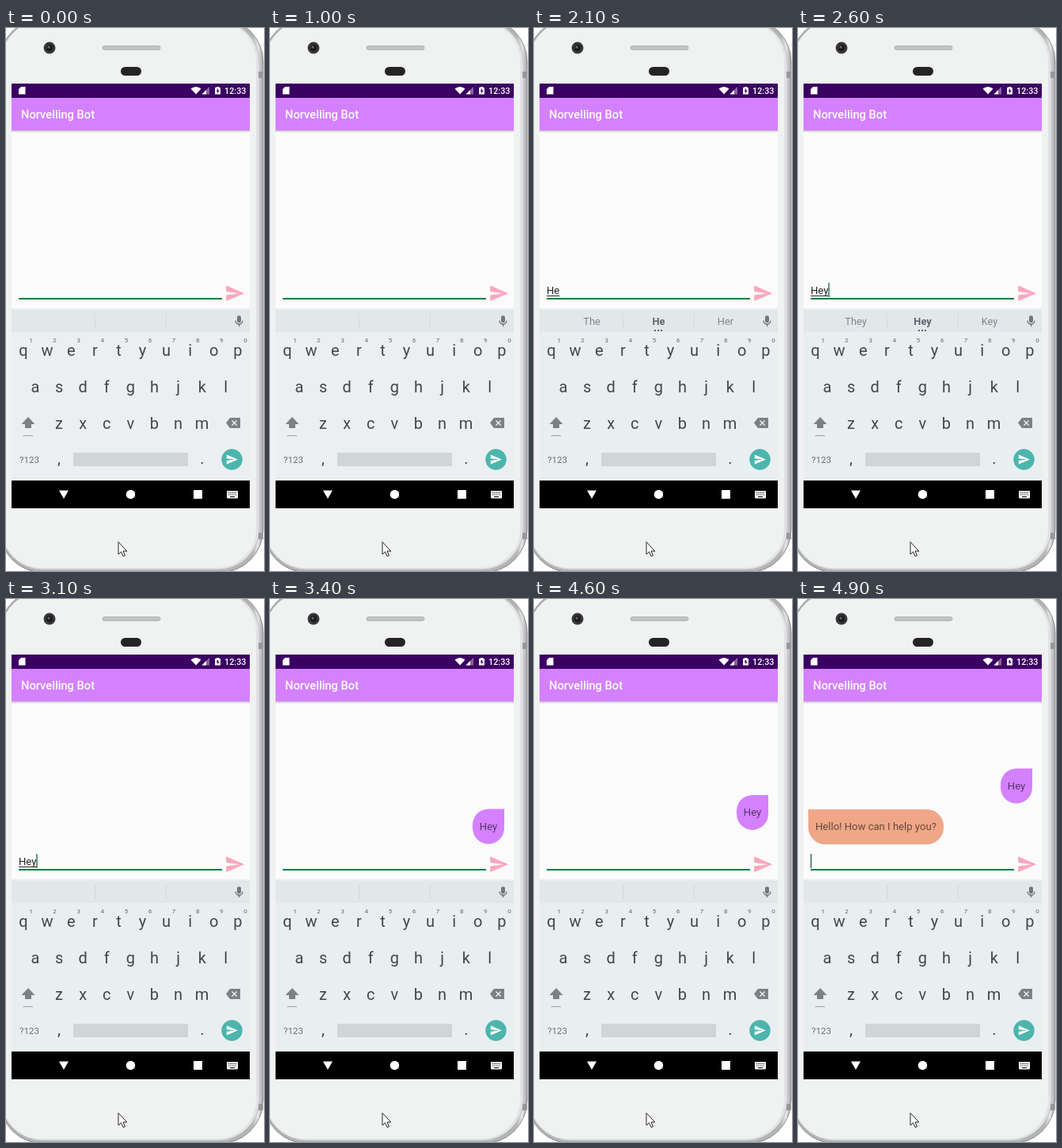
Animation of 326x684 px, one loop 5 s. Source, as an HTML page:

```html
<!DOCTYPE html>
<html lang="en">
<head>
<meta charset="utf-8">
<style>
html, body { margin: 0; width: 100%; height: 100%; overflow: hidden; background: #fff; }
svg { display: block; width: 326px; height: 684px; font-family: Roboto, sans-serif; }
.mid { text-anchor: middle; }
.key { font-size: 20px; fill: #40484c; }
.num { font-size: 8px; font-weight: 500; fill: #7b858a; }
.hint { font-size: 12.8px; fill: #7d888d; }
.msg { font-size: 13.1px; }
</style>
</head>
<body>
<svg viewBox="0 0 326 684">
  <defs>
    <linearGradient id="rim">
      <stop offset="0" stop-color="#b4b4b6"/><stop offset=".96" stop-color="#b4b4b6"/>
      <stop offset=".98" stop-color="#e6e6e8"/><stop offset="1" stop-color="#a2a2a6"/>
    </linearGradient>
    <linearGradient id="shade" x2="0" y2="1">
      <stop offset="0" stop-opacity=".22"/><stop offset="1" stop-opacity="0"/>
    </linearGradient>
    <clipPath id="chat"><path d="M7 129h301v224H7z"/></clipPath>
    <path id="plane" d="M2 21L23 12 2 3v7l15 2-15 2z"/>
  </defs>

  <!-- phone body -->
  <path d="M319.5 55V640" stroke="#d6d6d8" stroke-width="2"/>
  <rect x="-8" y="-12" width="333" height="698" rx="55" fill="url(#rim)" stroke="#8f8f93"/>
  <rect x="-6" y="-9" width="326" height="691" rx="52" fill="#e3e4e5" stroke="#c3c4c6"/>
  <rect x="-6" y="-8" width="322" height="688" rx="50" fill="#f0f1f1"/>
  <path d="M319 55h6v8h-6zM319 636h6v8h-6z" fill="#98989c"/>
  <circle cx="55" cy="25" r="7.5" fill="#3a3a3c"/>
  <circle cx="55" cy="25" r="4.5" fill="#1c1c1f"/>
  <circle cx="54" cy="24" r="1.6" fill="#6a6a72"/>
  <rect x="122" y="22.500" width="73" height="5" rx="2.500" fill="#c2c3c4" stroke="#aaabac" stroke-width=".8"/>
  <rect x="145" y="49" width="26" height="11" rx="5.500" fill="#242426"/>

  <!-- status and title bars -->
  <path d="M7 129h301v224H7z" fill="#fbfbfb"/>
  <path d="M7 129h301v3H7z" fill="url(#shade)"/>
  <path d="M7 70h301v18H7z" fill="#3a0062"/>
  <path d="M7 88h301v41H7z" fill="#d580ff"/>
  <g fill="#fff">
    <path d="M19 74h5.500v9.500h-8.500v-6.500z"/>
    <path d="M233.500 76.500q6.500-5 13 0l-6.500 7z"/>
    <path d="M257 74v9.500h-9.500z" opacity=".4"/>
    <path d="M253 78v5.500h-5.500z"/>
    <path d="M264 75h2v-1h3v1h2v8.500h-7z"/>
    <path d="M268 76l-2.500 3.500h1.700v3l2.500-3.800H268z" fill="#3a0062"/>
    <text x="276" y="83" font-size="10.800" font-weight="500">12:33</text>
    <text x="19" y="114" font-size="14.700" font-weight="500">Norvelling Bot</text>
  </g>

  <!-- conversation -->
  <g clip-path="url(#chat)">
    <g id="hey">
      <path d="M276 264.500h20v24a20 20 0 0 1-40 0v-4a20 20 0 0 1 20-20z" fill="#d580ff"/>
      <text class="msg mid" x="276" y="291" fill-opacity=".58">Hey</text>
    </g>
    <g id="reply">
      <path d="M13 265h150a21 21 0 0 1 21 21v2a21 21 0 0 1-21 21H34a21 21 0 0 1-21-21z" fill="#efa787"/>
      <text class="msg" x="22" y="291" fill-opacity=".58">Hello! How can I help you?</text>
    </g>
  </g>
  <text id="draft" class="msg" x="16" y="335" fill="#222"/>
  <path id="under" stroke="#222"/>
  <path id="caret" stroke="#12623c" stroke-width="1.300"/>
  <path d="M16 341h257" stroke="#0a8043" stroke-width="2"/>
  <use href="#plane" transform="translate(276 321) scale(1.1)" fill="#faa8bc"/>

  <!-- keyboard -->
  <path id="board" d="M7 353h301v217H7z"/>
  <path d="M7 355h301v28H7z" fill="#e2e7ea"/>
  <path d="M112.500 360v18M202.500 360v18" stroke="#d3d9dc"/>
  <g id="hints">
    <text class="hint mid" x="73" y="374"/>
    <text class="hint mid" x="157.500" y="374" style="font-weight:700;fill:#5b666b"/>
    <text class="hint mid" x="242" y="374"/>
    <path d="M152 380h2v2h-2zM156 380h2v2h-2zM160 380h2v2h-2z" fill="#5b666b"/>
  </g>
  <g fill="none" stroke="#70777b" stroke-width="1.400">
    <rect x="292.700" y="363" width="3.600" height="7.500" rx="1.800" fill="#70777b"/>
    <path d="M290 368.500a4.500 4.500 0 0 0 9 0M294.500 373v3"/>
  </g>
  <g id="keys"></g>
  <path d="M28 490l8.500 9H32v5h-8v-5h-4.500z" fill="#7b8286"/>
  <path d="M21.500 513.500h12.500" stroke="#9aa1a5"/>
  <path d="M283 491h13v13h-13l-5-6.500z" fill="#7b8286"/>
  <path d="M285.500 494.500l6 6m0-6l-6 6" stroke="#edf0f2" stroke-width="1.400"/>
  <text class="mid" x="29.500" y="548" font-size="11.500" fill="#667075">?123</text>
  <path d="M85 535h145v17H85z" fill="#d0d5d8"/>
  <circle cx="285.500" cy="543.500" r="13.200" fill="#4db6ac"/>
  <use href="#plane" transform="translate(277.500 535.500) scale(.67)" fill="#fff"/>

  <!-- navigation bar -->
  <path d="M7 570h301v35H7z"/>
  <g fill="#fff">
    <path d="M67 582.500h12l-6 10.500zM237 582h11v11h-11z"/>
    <circle cx="157.500" cy="587.500" r="5.700"/>
    <rect x="279" y="583" width="14" height="9.500" rx="1"/>
  </g>
  <path d="M281 585.500h10M281 588h10" stroke="#000" stroke-dasharray="1.200 1"/>
  <path d="M283 590.500h6" stroke="#000"/>

  <!-- mouse pointer -->
  <path d="M142 647.500v15.500l3.500-3.200 2.600 5.700 2.400-1-2.500-5.500h4.800z" fill="#fff" stroke="#222"/>
</svg>
<script>
const $ = id => document.getElementById(id);
const clamp = x => Math.max(0, Math.min(1, x));
const key = (s, x, y, cls = 'key') => `<text class="${cls} mid" x="${x}" y="${y}">${s}</text>`;
const row = (s, x, y, cls) => [...s].map((c, i) => key(c, x + 30.1 * i, y, cls)).join('');

$('keys').innerHTML = row('qwertyuiop', 22, 413) + row('1234567890', 31.5, 396, 'num') +
  row('asdfghjkl', 37, 459) + row('zxcvbnm', 67, 505) + key(',', 67, 549) + key('.', 248, 549);

// the last entry that has started: [start ms, value]
const at = (t, list) => list.filter(e => e[0] <= t).pop()[1];
const drafts = [[0, ''], [1500, 'H'], [1600, 'He'], [2500, 'Hey'], [3200, '']];
const hints = [[0, ''], [1700, 'The He Her'], [2600, 'They Hey Key'], [3100, '']];
const carets = [[0, 0], [1100, 1], [2100, 0], [2500, 1], [3400, 0], [4000, 1], [4500, 0], [4800, 1]];
const widths = [0, 9.3, 16.3, 22.5];

function draw(now) {
  const t = Math.floor(now % 5000 / 100) * 100;

  const text = at(t, drafts), end = 16.5 + widths[text.length];
  $('draft').textContent = text;
  $('under').setAttribute('d', text ? `M16 337.500H${end - .5}` : '');
  $('caret').setAttribute('d', at(t, carets) ? `M${end} 321v18` : '');

  const words = at(t, hints).split(' ');
  $('hints').style.display = words[1] ? '' : 'none';
  $('hints').querySelectorAll('text').forEach((el, i) => el.textContent = words[i] || '');

  const p = clamp((t - 4500) / 250);
  const rise = 51 * (.5 - Math.cos(p * Math.PI) / 2);
  $('hey').setAttribute('transform', `translate(0 ${-rise})`);
  $('hey').style.opacity = clamp((t - 3200) / 150);
  $('reply').style.opacity = clamp((t - 4750) / 120);
  $('board').setAttribute('fill', t < 1400 ? '#eceff1' : '#e9eff1');
  requestAnimationFrame(draw);
}
draw(performance.now());
</script>
</body>
</html>
```
